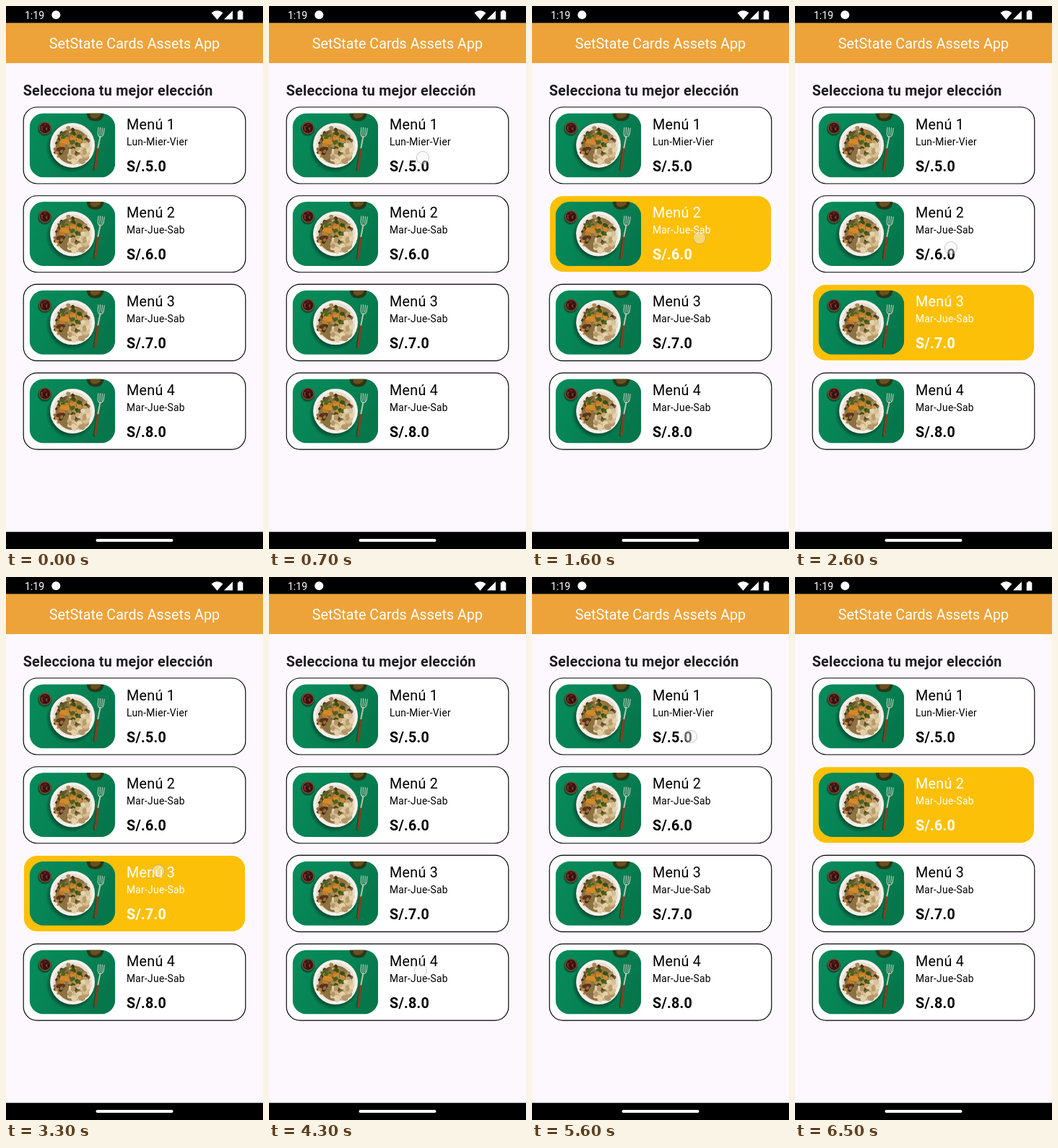
An HTML page for the animation above (7200 ms loop, 356 px wide and 752 px high).

```html
<!DOCTYPE html>
<html lang="es">
<head>
<meta charset="utf-8">
<title>Menu cards</title>
<style>
  html, body { margin: 0; width: 100%; height: 100%; overflow: hidden; background: #fdf8fe; }
  svg { display: block; width: 100%; height: 100%; }
  text { font-family: Roboto, sans-serif; font-size: 19.78px; letter-spacing: .247px; stroke: none; }
  .bold { font-weight: 700; }
  .days { font-size: 13.85px; }
  .card { --on: #fdc008; color: #000; fill: #fff; stroke: #000; stroke-width: 1.15;
          animation: 7.2s step-end infinite; }
  .card text { fill: currentColor; }
  .photo { stroke: none; }

  /* Selection: only one card is on at a time, a second tap turns it off. */
  @keyframes card1 {
    0%, 20.833%, 88.889% { color: #000; fill: #fff; stroke: #000; }
    11.111%, 79.167% { color: #fff; fill: var(--on); stroke: #fff; }
  }
  @keyframes card2 {
    0%, 30.556%, 44.444% { color: #000; fill: #fff; stroke: #000; }
    20.833%, 37.5%, 88.889%, 100% { color: #fff; fill: var(--on); stroke: #fff; }
  }
  @keyframes card3 {
    0%, 37.5%, 54.167%, 72.222% { color: #000; fill: #fff; stroke: #000; }
    30.556%, 44.444%, 65.278% { color: #fff; fill: var(--on); stroke: #fff; }
  }
  @keyframes card4 {
    0%, 59.03% { color: #000; fill: #fff; stroke: #000; }
    54.167% { color: #fff; fill: var(--on); stroke: #fff; }
  }

  .touch { fill: #f4f4f4; fill-opacity: .45; stroke: #9298a2; stroke-opacity: .65; stroke-width: .8;
           opacity: 0; animation: tap 7.2s linear infinite; }
  @keyframes tap {
    0%, 2.8% { opacity: 1; }
    4.2%, 100% { opacity: 0; }
  }
</style>
</head>
<body>
<svg viewBox="0 0 356 752" preserveAspectRatio="none">
  <defs>
    <linearGradient id="cloth" x2="1" y2=".5">
      <stop offset="0" stop-color="#078c5b"/>
      <stop offset=".5" stop-color="#078456"/>
      <stop offset="1" stop-color="#06764b"/>
    </linearGradient>
    <radialGradient id="shade">
      <stop offset=".8" stop-color="#03452c" stop-opacity=".85"/>
      <stop offset="1" stop-color="#03452c" stop-opacity="0"/>
    </radialGradient>
    <clipPath id="frame"><rect width="118.7" height="89" rx="19.8"/></clipPath>
    <g id="photo" clip-path="url(#frame)">
      <rect width="118.7" height="89" fill="url(#cloth)"/>
      <path d="M79 0H103Q102 11 91 11T79 0Z" fill="#2b3717"/>
      <path d="M84 0H99Q98 6 91 7T84 0Z" fill="#6b501f"/>
      <circle cx="21" cy="22" r="10.5" fill="url(#shade)"/>
      <circle cx="21.5" cy="20.5" r="8.6" fill="#81482b"/>
      <circle cx="21.5" cy="20.5" r="7.2" fill="#3b1513"/>
      <g id="seeds"></g>
      <circle cx="57.5" cy="47.5" r="35" fill="url(#shade)"/>
      <circle cx="59.5" cy="44.5" r="31" fill="#f5f1ea"/>
      <circle cx="59.5" cy="44.5" r="27" fill="#e6dfd2"/>
      <ellipse cx="59.5" cy="46" rx="23.5" ry="24.5" fill="#8c7242"/>
      <g id="food"></g>
      <g fill="none" stroke-linecap="round">
        <path d="M94 50 90 78" stroke="#04512f" stroke-width="4"/>
        <path d="M94.5 49 91 78" stroke="#84401f" stroke-width="3.2"/>
        <path d="M98 32 94.8 48" stroke="#c9c8b8" stroke-width="1.8"/>
        <path d="M95.3 20 94.6 28Q95 33 98 33T102.600 29L103.600 21M98 20 97.400 30M100.800 20.500 100.200 30"
              stroke="#c4cbb9" stroke-width="1.1"/>
      </g>
    </g>
  </defs>

  <rect width="356" height="752" fill="#fdf8fe"/>
  <rect width="356" height="23.7" fill="#000"/>
  <rect y="23.7" width="356" height="55.4" fill="#eda339"/>
  <rect y="728.3" width="356" height="23.7" fill="#000"/>
  <rect x="124.5" y="738" width="107" height="4" rx="2" fill="#fff"/>

  <g fill="#fff">
    <text x="26" y="17.6" style="font-size:14px;letter-spacing:0">1:19</text>
    <circle cx="69.3" cy="12.3" r="6"/>
    <path d="M284.5 9.5Q292.5 2.8 300.5 9.5L292.5 19Z"/>
    <path d="M314 6.5V18.5H302Z"/>
    <path d="M322.6 7.5V6H326.6V7.5H328.3V18.7H320.8V7.5Z"/>
    <text x="178" y="58.6" text-anchor="middle" style="letter-spacing:0">SetState Cards Assets App</text>
  </g>
  <text class="bold" x="23.7" y="123.8" fill="#1d1b20">Selecciona tu mejor elección</text>
  <g id="cards"></g>
  <g id="touches"></g>
</svg>
<script>
  const put = (id, markup) => { document.getElementById(id).innerHTML = markup; };
  const times = (n, make) => Array.from({ length: n }, (_, i) => make(i)).join('');

  let seed = 17;
  const random = () => (seed = seed * 16807 % 2147483647) / 2147483647;

  // Scatters small rounded pieces inside an ellipse.
  const scatter = (n, cx, cy, rx, ry, size, colors) => times(n, i => {
    const angle = random() * Math.PI * 2, reach = Math.sqrt(random());
    const x = cx + Math.cos(angle) * rx * reach, y = cy + Math.sin(angle) * ry * reach;
    const w = size * (.6 + random() * .6), turn = random() * 180;
    return `<ellipse rx="${w.toFixed(1)}" ry="${(w * .75).toFixed(1)}" fill="${colors[i % colors.length]}"
      transform="translate(${x.toFixed(1)} ${y.toFixed(1)}) rotate(${turn.toFixed()})"/>`;
  });

  put('seeds', scatter(14, 21.5, 20.5, 5, 5, 1.5, ['#6e2420', '#220b0c', '#8b3a30']));
  put('food',
    scatter(60, 59, 38, 23, 18, 3.2, ['#7d5c2e', '#a98c58', '#49331a', '#c7ad78', '#5b5a26']) +
    scatter(26, 42, 48, 7, 13, 2.8, ['#5d321b', '#937040', '#3f2b15', '#c98a35']) +
    scatter(28, 56, 38, 17, 13, 3.8, ['#365019', '#d18a2c', '#4a6322', '#c27a24']) +
    scatter(34, 67, 59, 13, 10, 4.6, ['#d6bf93', '#c8ab79', '#e3d0aa', '#b6976a']) +
    scatter(14, 78, 48, 5, 8, 3.8, ['#d8c297', '#b99d6c', '#e4d3ae']));

  put('cards', times(4, i => `
    <g class="card" style="animation-name:card${i + 1}" transform="translate(23.7 ${139.5 + i * 122.7})">
      <rect x=".5" y=".5" width="307.6" height="106" rx="19"/>
      <use class="photo" href="#photo" x="8.9" y="8.9"/>
      <text x="143.3" y="31">Menú ${i + 1}</text>
      <text class="days" x="143.3" y="53.2">${i ? 'Mar-Jue-Sab' : 'Lun-Mier-Vier'}</text>
      <text class="bold" x="143.3" y="89.3">S/.${i + 5}.0</text>
    </g>`));

  // Each tap: start in ms, then the point touched.
  const taps = [
    [630, 213, 210], [1420, 232, 321], [2120, 212, 455], [2530, 216, 335],
    [3120, 211, 407], [3810, 211, 560], [4170, 210, 545], [4630, 211, 463],
    [5120, 211, 463], [5550, 220, 221], [6180, 218, 325]
  ];
  put('touches', taps.map(([start, x, y]) =>
    `<circle class="touch" cx="${x}" cy="${y}" r="8.6" style="animation-delay:${start}ms"/>`).join(''));
</script>
</body>
</html>
```
